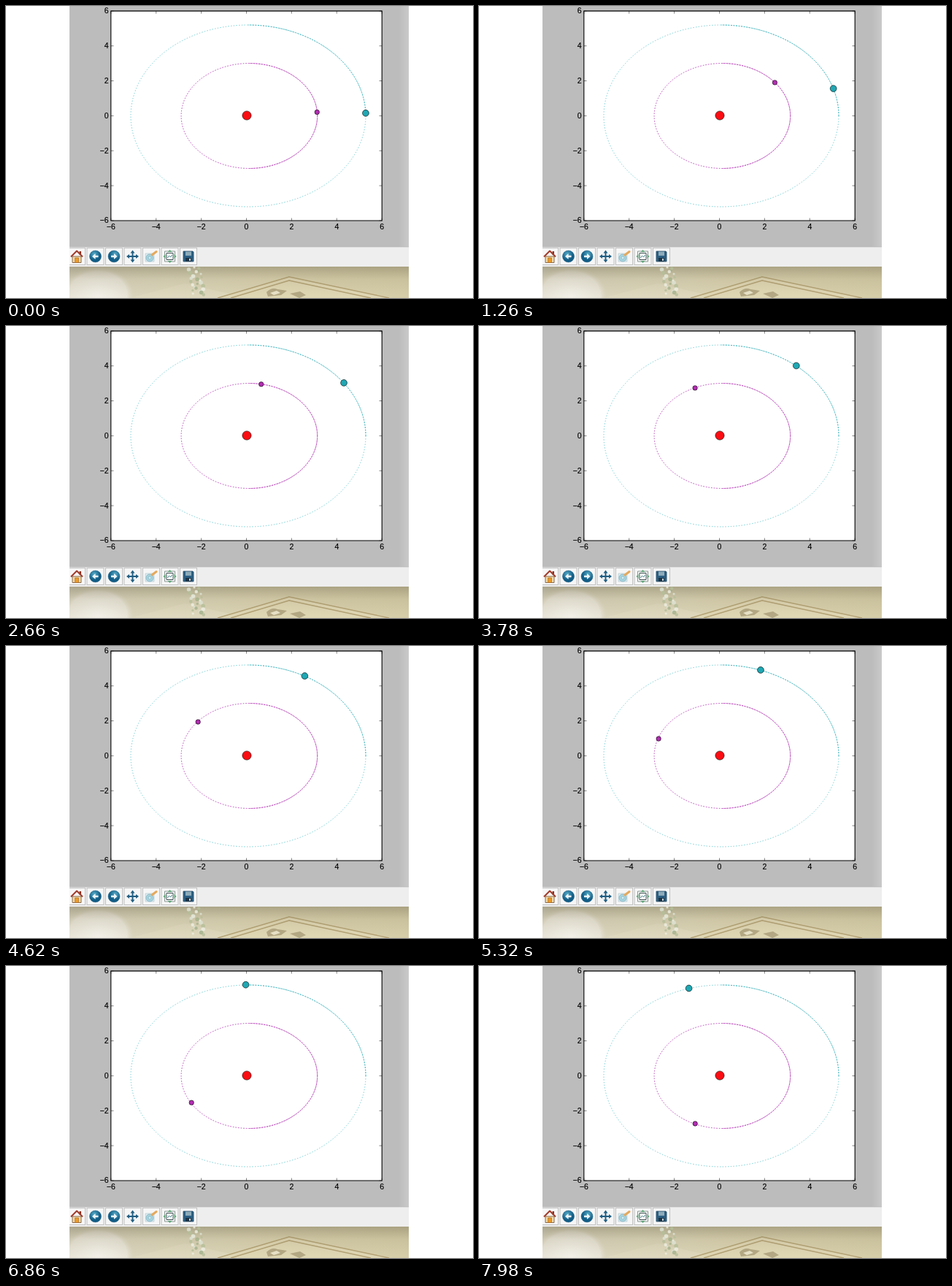
Recreate the animation shown at these times as an HTML page. Size 640x400 px, loop 8000 ms.

```html
<!DOCTYPE html>
<html lang="en">
<head>
<meta charset="utf-8">
<title>Two orbits</title>
<style>
html, body { margin: 0; width: 100%; height: 100%; overflow: hidden; background: #fff; }
svg { display: block; width: 640px; height: 400px; }
text { font: 10.5px "Liberation Sans", Arial, sans-serif; fill: #000; stroke: #000; stroke-width: .15; }
.btn { fill: #f6f6f6; stroke: #c2c2c2; }
.dots { fill: none; stroke-width: .9; stroke-dasharray: 1.3 2.4; }
</style>
</head>
<body>
<svg viewBox="0 0 640 400">
  <defs>
    <linearGradient id="wall" x2="1" y2="0">
      <stop offset="0" stop-color="#d8d4c0"/>
      <stop offset=".3" stop-color="#dbd5ba"/>
      <stop offset=".6" stop-color="#dad2b0"/>
      <stop offset="1" stop-color="#d6cda9"/>
    </linearGradient>
    <linearGradient id="shade" x2="0" y2="1">
      <stop offset="0" stop-color="#6b6448" stop-opacity=".42"/>
      <stop offset=".4" stop-color="#756c49" stop-opacity=".13"/>
      <stop offset="1" stop-color="#857c58" stop-opacity="0"/>
    </linearGradient>
    <radialGradient id="glow">
      <stop offset="0" stop-color="#f3f1e9"/>
      <stop offset=".8" stop-color="#e9e5d8"/>
      <stop offset="1" stop-color="#ddd6c0" stop-opacity="0"/>
    </radialGradient>
    <linearGradient id="edge">
      <stop offset="0" stop-color="#fff" stop-opacity="0"/>
      <stop offset="1" stop-color="#fff" stop-opacity=".2"/>
    </linearGradient>
    <radialGradient id="ball" cx=".4" cy=".3">
      <stop offset="0" stop-color="#55a9c6"/>
      <stop offset="1" stop-color="#125d86"/>
    </radialGradient>
    <clipPath id="window"><path d="M87 0H552V400H87z"/></clipPath>
  </defs>

  <g clip-path="url(#window)">
    <path d="M87 0H552V330H87z" fill="#bcbcbc"/>
    <path d="M538 0H552V330H538z" fill="url(#edge)"/>
    <path d="M87 330H552V357H87z" fill="#eee"/>
    <path d="M87 330H552" stroke="#b4b4b4" stroke-width=".6"/>

    <!-- soft desktop picture -->
    <path d="M87 357H552V400H87z" fill="url(#wall)"/>
    <ellipse cx="126" cy="396" rx="50" ry="40" fill="url(#glow)"/>
    <path d="M170 400L245 380L330 400z" fill="#e3dcc4" opacity=".6"/>
    <path d="M294 400L388 371L525 400z" fill="#e0d7b5"/>
    <path d="M290 400L388 371L525 400M308 400L388 376L500 400" fill="none" stroke="#b3a274" stroke-width="1.4"/>
    <path d="M357 392q7-7 15-4l13 2-8 6-18 2zM389 394l14-3 8 5-9 4z" fill="#b4a984"/>
    <path d="M362 393l9-3 5 3-9 3z" fill="#eae3c9"/>
    <path d="M87 357H552V400H87z" fill="url(#shade)"/>
    <g id="flowers"></g>

    <!-- toolbar -->
    <g id="buttons"></g>
    <g stroke-linejoin="round" stroke-width=".8">
      <path d="M91 343h12v8.500h-12z" fill="#f1dcae" stroke="#70492d"/>
      <path d="M100.500 336h2.500v5h-2.500z" fill="#8c3021"/>
      <path d="M89 343.500L97 335.500l8 8" fill="none" stroke="#a03a2a" stroke-width="2"/>
      <path d="M94.500 345h5v6.500h-5z" fill="#ec9b28" stroke="#a06428" stroke-width=".6"/>
    </g>
    <g id="back" transform="translate(122.500 343)">
      <circle r="8" fill="url(#ball)" stroke="#15577a" stroke-width=".5"/>
      <path d="M-4.500 0L0-4V-1.300H4V1.300H0V4z" fill="#f0f7fa"/>
    </g>
    <use href="#back" transform="matrix(-1 0 0 1 270.500 0)"/>
    <g transform="translate(173.500 343)" fill="#215e82">
      <path d="M-6-1H6V1H-6zM-1-6H1V6H-1z"/>
      <path d="M-8.500 0l4-3v6zM8.500 0l-4-3v6zM0-8.500l-3 4h6zM0 8.500l-3-4h6z"/>
    </g>
    <g transform="translate(199 343)">
      <path d="M-8-4H4V7H-8z" fill="#dcebef" stroke="#b5ccd3" stroke-width=".7"/>
      <circle cx="-2" cy="2" r="5" fill="#a9d5df" stroke="#7fb3c3" stroke-width=".8"/>
      <circle cx="-2" cy="2" r="2" fill="#d7edf0" stroke="#6baabd" stroke-width=".6"/>
      <path d="M1-2L7-6.500" stroke="#e5a95c" stroke-width="3" stroke-linecap="round"/>
    </g>
    <g transform="translate(224.500 343)">
      <path d="M-7-7H7V7H-7z" fill="#fafafa" stroke="#6f7f7a" stroke-width=".8"/>
      <path d="M-4.500-4.500H4.500V4.500H-4.500z" fill="#fff" stroke="#3b4d50"/>
      <path d="M-3 2L-1-1 1 1 3-2" fill="none" stroke="#397c83" stroke-width=".9"/>
      <path d="M0-9l-3 3h6zM0 9l-3-3h6zM-9 0l3-3v6zM9 0l-3-3v6z" fill="#5fa579"/>
    </g>
    <g transform="translate(250 343)">
      <path d="M-7-7H6L7-6V7H-7z" fill="#2c5f82" stroke="#234a66" stroke-width=".8"/>
      <path d="M-4-6.500H4V-1H-4z" fill="#8dabb9"/>
      <path d="M-4 2H4V7H-4z" fill="#1c3345"/>
      <path d="M1 3H3V6H1z" fill="#c7d2d8"/>
    </g>
  </g>

  <path d="M143.800 6.900H515.200V294H143.800z" fill="#fff"/>
  <g id="axes"></g>

  <g class="dots" stroke="#55c2ca">
    <ellipse cx="332" cy="150.500" rx="161" ry="124.500"/>
    <path d="M493 150.500A161 124.500 0 0 0 332 26" stroke="#3db0ba" stroke-dasharray="2 1.500"/>
  </g>
  <g class="dots" stroke="#b640b6">
    <ellipse cx="333.400" cy="150.500" rx="93.300" ry="72" stroke-dasharray="1.700 1.900"/>
    <path d="M333.400 222.500A93.300 72 0 0 0 426.700 150.500A93.300 72 0 0 0 333.400 78.500" stroke-width=".7" stroke-dasharray="2.400 1"/>
  </g>
  <path d="M143.800 6.900H515.200V294H143.800z" fill="none" stroke="#000" stroke-width="1.100"/>
  <g stroke="#000" stroke-width=".6">
    <circle cx="330" cy="150" r="6.100" fill="#fb0d12"/>
    <circle id="inner" r="3.200" fill="#b32db3"/>
    <circle id="outer" r="4.400" fill="#1fa8b4"/>
  </g>
</svg>
<script>
const STEP = 140, LOOP = 8000;
const $ = id => document.getElementById(id);

function add(parent, tag, attrs, text = "") {
  const el = document.createElementNS("http://www.w3.org/2000/svg", tag);
  for (const name in attrs) el.setAttribute(name, attrs[name]);
  el.textContent = text;
  parent.append(el);
}

for (let v = -6; v <= 6; v += 2) {
  const x = 329.5 + 30.95 * v, y = 150.4 - 23.93 * v;
  const label = String(v).replace("-", "\u2212");
  add($("axes"), "path", {
    d: `M${x} 294v-3.500M${x} 7v3.500M144 ${y}h3.500M515 ${y}h-3.500`, stroke: "#000", "stroke-width": .5
  });
  add($("axes"), "text", { x, y: 305.5, "text-anchor": "middle" }, label);
  add($("axes"), "text", { x: 140.5, y: y + 3.5, "text-anchor": "end" }, label);
}

for (let i = 0; i < 7; i++) {
  add($("buttons"), "rect", {
    x: 85.5 + 25.5 * i, y: 331.5, width: 23, height: 23, class: "btn"
  });
}

const petals = ["#eeefe2", "#b4be98", "#dde3d4", "#a3b089"];
for (let i = 0; i < 26; i++) {
  add($("flowers"), "circle", {
    cx: 258 + 8 * Math.sin(i * 2.3) + i * .25, cy: 358 + i * 1.5,
    r: 1.6 + i % 3 * .6, fill: petals[i % 4], opacity: .8
  });
}

// Orbit angles in radians at a few steps
const knots = [0, 9, 19, 27, 38, 49, 57];
const orbits = [
  { el: $("outer"), cx: 332, cy: 150.2, rx: 161, ry: 124.5, angles: [.028, .303, .62, .878, 1.229, 1.592, 1.85] },
  { el: $("inner"), cx: 333.8, cy: 150.4, rx: 92.7, ry: 71.7, angles: [.07, .688, 1.398, 1.99, 2.81, 3.68, 4.295] }
];

function angleAt(angles, step) {
  let i = 0;
  while (i < knots.length - 2 && step > knots[i + 1]) i++;
  const part = (step - knots[i]) / (knots[i + 1] - knots[i]);
  return angles[i] + (angles[i + 1] - angles[i]) * part;
}

function draw() {
  const step = Math.floor(performance.now() % LOOP / STEP);
  for (const { el, cx, cy, rx, ry, angles } of orbits) {
    const a = angleAt(angles, step);
    el.setAttribute("cx", cx + rx * Math.cos(a));
    el.setAttribute("cy", cy - ry * Math.sin(a));
  }
  requestAnimationFrame(draw);
}
draw();
</script>
</body>
</html>
```
